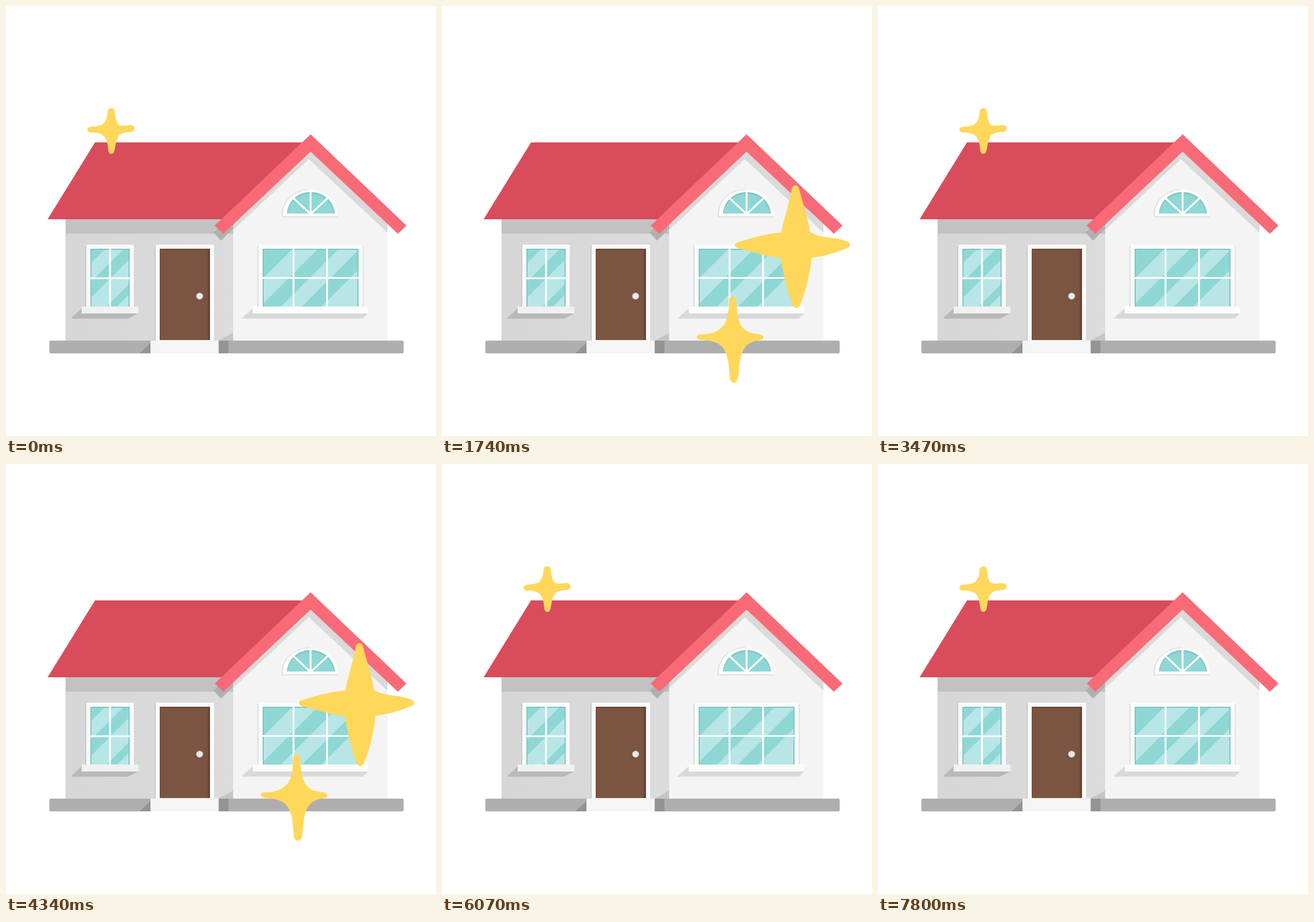
An HTML page for the animation above (8 s loop, 744 px wide and 744 px high).

```html
<!DOCTYPE html>
<html lang="en">
<head>
<meta charset="utf-8">
<title>Sparkling house</title>
<style>
  html, body { margin: 0; width: 100%; height: 100%; overflow: hidden; background: #fff; }
  svg { display: block; width: 100%; height: 100%; }
  #stars { fill: #ffd75b; }
  #stars g { visibility: hidden; }
  #stars g.on { visibility: visible; }
  .frame { fill: #f9fdfb; }
  .light { fill: #b8e6e6; }
  .dark { fill: #8fd7d5; }
  .inset { fill: #82c5c3; }
  .bars { stroke: #f9fdfb; stroke-width: 3.2; fill: none; }
</style>
</head>
<body>
<svg viewBox="0 0 744 744">
  <defs>
    <linearGradient id="wall">
      <stop offset="0" stop-color="#d6d6d6"/>
      <stop offset="1" stop-color="#dcdcdc"/>
    </linearGradient>
    <clipPath id="gable"><path d="M393 579V376L527 250 660 376V579Z"/></clipPath>
    <clipPath id="smallPane"><path d="M146 420H214V520H146Z"/></clipPath>
    <clipPath id="widePane"><path d="M444 420H610V520H444Z"/></clipPath>
    <path id="twinkle" d="M176 183C175 175 189 175 188 183C190 195 191 204 197 206C204 208 210 206 215 206C225 206 225 218 215 218C207 219 199 219 195 225C190 232 190 240 188 249C187 258 178 258 177 250C176 240 175 232 170 226C165 220 157 219 148 219C139 220 138 209 147 209C155 208 164 208 169 203C174 198 175 190 176 183Z"/>
    <path id="flare" d="M497 507C498 500 508 501 509 508C510 532 513 548 519 555C526 565 538 567 550 568C558 570 558 576 551 578C538 579 527 584 521 596C513 612 515 629 512 645C510 654 500 654 498 645C496 629 498 612 488 594C480 581 464 579 450 578C438 577 438 568 448 568C462 569 478 564 487 553C496 541 496 526 497 507Z"/>
  </defs>

  <!-- left wing -->
  <path fill="url(#wall)" d="M103 369H394V579H103Z"/>
  <path fill="#c2c2c2" d="M103 369H394V394H103Z"/>
  <path fill="#b0b0b0" d="M359 392 376 376H393V385L372 406Z"/>
  <path fill="#c5c5c5" d="M368 579 393 565V579Z"/>
  <path fill="#d94c5c" d="M154 236H530L390 369H72Z"/>

  <!-- gable -->
  <g clip-path="url(#gable)">
    <path fill="#f4f4f4" d="M393 240H660V579H393Z"/>
    <path fill="#dadada" d="M527 240 380 380 380 400 524 265 665 397V370Z"/>
  </g>
  <path fill="#f96a77" d="M527 222 693 380 678 394 527 252 376 394 361 380Z"/>

  <!-- ground and step -->
  <rect x="75" y="579" width="613" height="22" rx="2" fill="#aeaeae"/>
  <path fill="#949494" d="M231 601 250 583V601ZM368 579H385V601H368Z"/>
  <path fill="#f5f5f5" d="M250 579H368V601H250Z"/>

  <!-- door -->
  <path fill="#c9c9c9" d="M257 415H260V579H257Z"/>
  <path class="frame" d="M259 413H360V579H259Z"/>
  <path fill="#6b4332" d="M266 420H353V578H266Z"/>
  <path fill="#7a5541" d="M267 422H349V578H267Z"/>
  <circle cx="335" cy="502" r="5.8" fill="#e9e9e9"/>

  <!-- left window -->
  <path fill="#b9b9b9" d="M112 541 131 523H229V532L211 541Z"/>
  <path fill="#c9c9c9" d="M137 415H140V521H137Z"/>
  <path class="frame" d="M139 413H221V521H139Z"/>
  <g clip-path="url(#smallPane)">
    <path class="light" d="M146 420H214V520H146Z"/>
    <path class="dark" d="M140 414H178L140 452ZM214 410V438L136 516V488ZM230 464V482L186 526H168Z"/>
    <path class="inset" d="M146 420H214V422H148V520H146ZM212 420H214V520H212Z"/>
    <path class="bars" d="M180 420V520M146 471H214"/>
  </g>
  <path fill="#f1f1f1" d="M131 520H229V532H131Z"/>

  <!-- wide window -->
  <path fill="#d9d9d9" d="M407 541 428 522H627V532L617 541Z"/>
  <path fill="#dedede" d="M435 415H438V521H435Z"/>
  <path class="frame" d="M437 413H617V521H437Z"/>
  <path fill="#e2e2e2" d="M617 415H619V521H617Z"/>
  <g clip-path="url(#widePane)">
    <path class="light" d="M444 420H610V520H444Z"/>
    <path class="dark" d="M440 416H500L440 476ZM546 414H582L470 526H434ZM622 410V444L540 526H506Z"/>
    <path class="inset" d="M444 420H610V422H446V520H444ZM608 420H610V520H608Z"/>
    <path class="bars" d="M497.500 420V520M555.500 420V520M444 470.500H610"/>
  </g>
  <path fill="#fcfcfc" d="M427 520H627V532H427Z"/>

  <!-- arched window -->
  <path fill="#dedede" d="M477 365V360C478 334 500 317 526 317L530 365Z"/>
  <path class="frame" d="M479 364V359C480 335 501 318 527 318S573 335 574 359V364Z"/>
  <path class="inset" d="M486 359C488 337 505 322 527 322S567 337 569 359Z"/>
  <path class="dark" d="M487 359C489 339 506 325 527 325S565 339 567 359Z"/>
  <path class="bars" d="M527 320V360M527 360 497 332M527 360 557 332"/>
  <path fill="#dcdcdc" d="M479 364H574V365.500H479Z"/>

  <g id="stars">
    <g><use href="#twinkle"/></g>
    <g><use href="#flare" transform="translate(101 119) scale(1.357 1.293) translate(-441 -502)"/></g>
    <g>
      <use href="#twinkle" transform="translate(612 414) scale(1.22) translate(-182 -213)"/>
      <use href="#twinkle" transform="translate(503 576) scale(1.06) translate(-182 -213)"/>
    </g>
    <g>
      <path d="M605 317C606 308 616 308 618 317C624 341 633 366 637 391C652 401 675 400 690 404C709 408 711 416 698 420C679 428 659 433 639 436C637 463 629 495 620 516C616 525 610 525 606 516C595 488 591 462 586 436C563 434 538 425 515 420C504 417 504 410 514 408C538 401 563 393 587 392C592 366 601 341 605 317Z"/>
      <use href="#flare"/>
    </g>
  </g>
</svg>
<script>
  const LOOP = 8000, CYCLE = 2600;
  const steps = [[0, 0], [440, 1], [870, 0], [1300, 2], [1740, 3], [2170, 2]];
  const groups = document.querySelectorAll('#stars > g');

  function draw() {
    const t = performance.now() % LOOP % CYCLE;
    const active = steps.filter(([start]) => start <= t).pop()[1];
    groups.forEach((g, i) => g.classList.toggle('on', i === active));
    requestAnimationFrame(draw);
  }
  draw();
</script>
</body>
</html>
```
